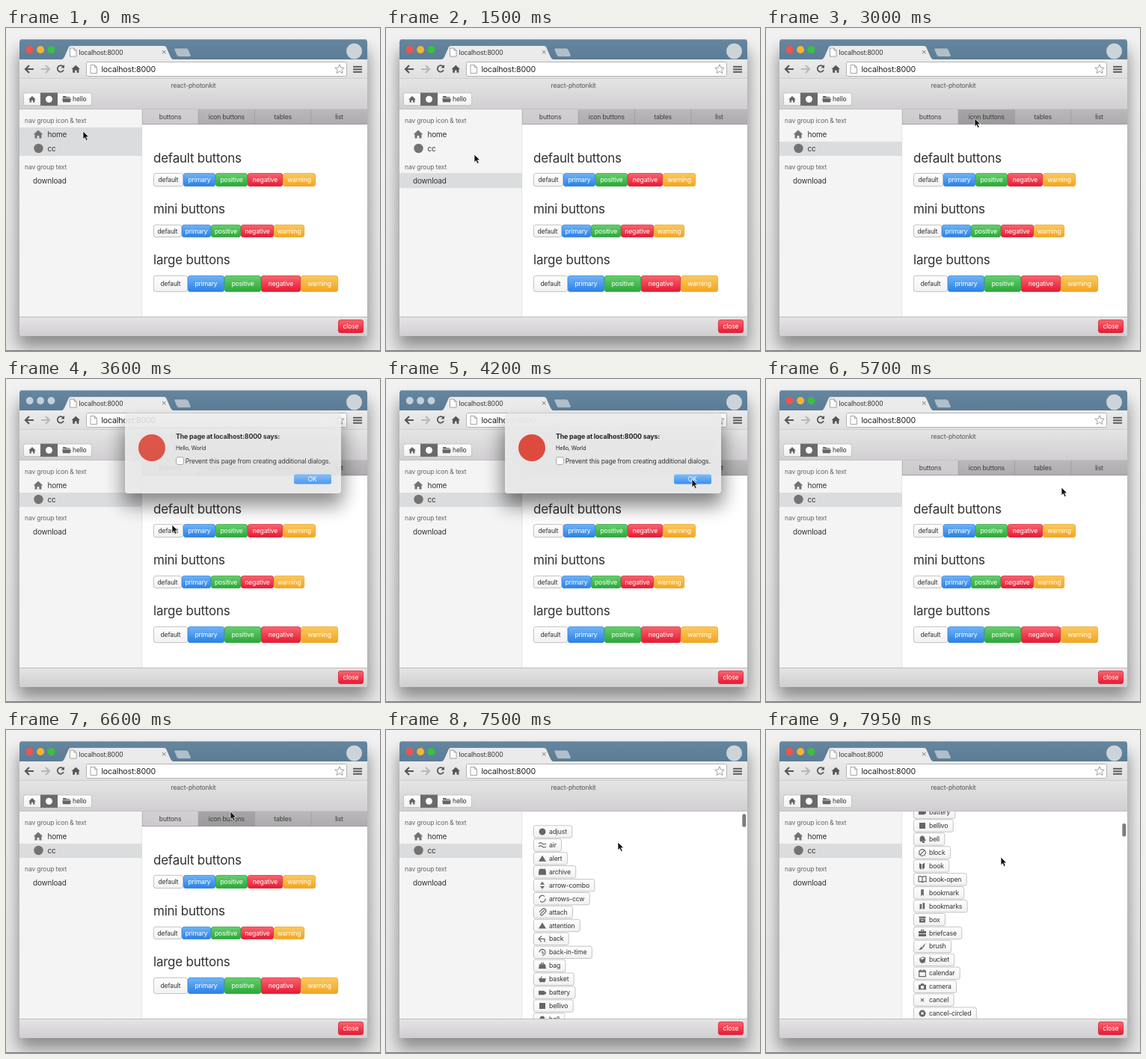
These frames come from a looping animation (500x432 px, 8000 ms). An HTML page:

```html
<!DOCTYPE html>
<html lang="en">
<head>
<meta charset="utf-8">
<title>Desktop component kit demo</title>
<style>
html, body { margin: 0; width: 100%; height: 100%; overflow: hidden; background: #ededed; }
svg { display: block; width: 500px; height: 432px; }
text { font-family: Inter, Roboto, "Liberation Sans", sans-serif; letter-spacing: -.02em; white-space: pre; }
</style>
</head>
<body>
<svg id="stage" viewBox="0 0 500 432" xmlns="http://www.w3.org/2000/svg"></svg>
<script>
const LOOP = 8000, STEP = 150;
const stage = document.getElementById('stage');

// Markup helpers
const rect = (x, y, w, h, fill, more = '') =>
  `<rect x="${x}" y="${y}" width="${w}" height="${h}" fill="${fill}" ${more}/>`;
const text = (x, y, str, size, fill = '#333', more = '') =>
  `<text x="${x}" y="${y}" font-size="${size}" fill="${fill}" ${more}>${str}</text>`;
const path = (d, fill = 'none', more = '') => `<path d="${d}" fill="${fill}" ${more}/>`;
const circle = (x, y, r, fill, more = '') => `<circle cx="${x}" cy="${y}" r="${r}" fill="${fill}" ${more}/>`;
const group = (body, more = '') => `<g ${more}>${body}</g>`;
const line = (d, color, w = 1, more = '') => path(d, 'none', `stroke="${color}" stroke-width="${w}" ${more}`);
const gradient = (id, top, bottom) =>
  `<linearGradient id="${id}" x2="0" y2="1"><stop stop-color="${top}"/><stop offset="1" stop-color="${bottom}"/></linearGradient>`;
const MID = 'text-anchor="middle"';

const DEFS = `<defs>
  ${gradient('gBack', '#f1f1f1', '#e6e6e6')}
  ${gradient('gTop', '#66869f', '#5b7c96')}
  ${gradient('gTool', '#ebebeb', '#dfdfdf')}
  ${gradient('gBar', '#e6e5e6', '#d0ced0')}
  ${gradient('gTab', '#bab8ba', '#adabad')}
  ${gradient('gHover', '#a7a5a7', '#9b999b')}
  ${gradient('gActive', '#d2d0d2', '#cbc9cb')}
  ${gradient('gDefault', '#fefefe', '#f1f1f1')}
  ${gradient('gPrimary', '#70b4f7', '#2a80e6')}
  ${gradient('gPositive', '#67cf6e', '#2aa838')}
  ${gradient('gNegative', '#fa6570', '#e71832')}
  ${gradient('gWarning', '#fbc95f', '#f3a51f')}
  ${gradient('gOk', '#7fbcf7', '#3b8ff0')}
  <filter id="soft" x="-20%" y="-20%" width="140%" height="150%"><feGaussianBlur stdDeviation="10.500"/></filter>
  <filter id="halo" x="-20%" y="-50%" width="140%" height="200%"><feGaussianBlur stdDeviation="13"/></filter>
  <clipPath id="frame"><rect x="18" y="15" width="465" height="397" rx="4"/></clipPath>
  <clipPath id="pane"><rect x="182" y="109" width="301" height="277"/></clipPath>
</defs>`;

const homeIcon = (x, y, s, fill) =>
  path('M0-5.5L6 0H4.3V5H1.3V1.5H-1.3V5H-4.3V0H-6Z', fill, `transform="translate(${x} ${y}) scale(${s})"`);
const folderIcon = (x, y) =>
  path(`M${x} ${y}v-2.5h4l1 1.2h4.5v1.3zM${x - .8} ${y + .8}h11.6l-.8 5h-10z`, '#666');
const pageIcon = (x, y) =>
  path(`M${x} ${y}h5.5l3 3v8h-8.5z`, '#fff', 'stroke="#8d8d8d" stroke-width=".8"') +
  line(`M${x + 5.5} ${y}v3h3`, '#8d8d8d', .8);

function browser() {
  const lights = ['#f1544d', '#f6b52f', '#37c23e'];
  return rect(18, 15, 465, 28, 'url(#gTop)') +
    line('M18 15.5H483', '#86a0b4') +
    lights.map((c, i) => circle(31.7 + i * 14.4, 29, 4.9, c, 'class="light"')).join('') +
    path('M73 42.5Q76 42 77.500 39L83 26.500Q84 23.500 87 23.500H211Q214 23.500 215 26.500L220.500 39Q222 42 225 42.500Z', '#ebebeb', 'stroke="#4d6a81" stroke-width=".6"') +
    path('M226 27H241Q243 27 244 29L247 36Q248 38.500 245 38.500H231Q229 38.500 228 36L225 29Q224.500 27 226 27Z', '#b0bfca', 'stroke="#557288" stroke-width=".6"') +
    pageIcon(85.5, 27) + text(97.5, 36, 'localhost:8000', 8.7) +
    line('M209 30L213.500 34.500M213.500 30L209 34.500', '#777', 1) +
    circle(465.5, 31, 10.5, '#cdd4d9') +
    rect(18, 42, 465, 26, 'url(#gTool)') +
    line('M37 55H26.500M31 50L26 55L31 60', '#555', 2.2) +
    line('M47 55H57.500M53 50L58 55L53 60', '#b9b9b9', 2.2) +
    line('M76.500 51.700A4.300 4.300 0 1 0 77 56.200', '#555', 1.8) + path('M78 49V53.500H73.500Z', '#555') +
    homeIcon(93.3, 55, .95, '#555') +
    rect(107.5, 45.5, 348, 19, '#fff', 'rx="2" stroke="#b4b4b4"') +
    pageIcon(113, 49.5) + text(127.5, 58.5, 'localhost:8000', 10.7, '#222') +
    path('M446 48.800L447.800 53L452.200 53.300L448.800 56.200L449.900 60.500L446 58.100L442.100 60.500L443.200 56.200L439.800 53.300L444.200 53Z', '#fff', 'stroke="#8a8a8a" stroke-width=".8"') +
    [51, 54.5, 58].map(y => rect(464, y - .2, 12, 2, '#5c5c5c')).join('');
}

function header() {
  return rect(18, 67, 465, 42, 'url(#gBar)') +
    line('M18 67.500H483', '#cfcfcf') + line('M18 108.700H483', '#bdbbbd', .8) +
    text(250.5, 79.5, 'react-photonkit', 8.6, '#555', MID) +
    rect(23.5, 87, 91, 16.5, 'url(#gDefault)', 'rx="2.500" stroke="#bdbbbd" stroke-width=".8"') +
    rect(46, 86.6, 23, 17.3, '#6b6a6b') +
    homeIcon(35, 95.5, .8, '#666') + circle(57.5, 95.3, 4.5, '#fff') +
    folderIcon(76, 93.5) + text(89, 98.3, 'hello', 8.6);
}

function sidebar() {
  return rect(18, 109, 164, 277, '#f4f4f4') +
    rect(18, 133, 164, 19, '#dbdcde', 'id="mark"') +
    rect(18, 133, 164, 19, '#dbdcde', 'id="press"') +
    line('M181.700 109V386', '#dcdcdc', .7) +
    text(25, 127, 'nav group icon &amp; text', 8.6, '#666') +
    homeIcon(43, 142.3, 1.05, '#737373') + text(55.5, 146, 'home', 10) +
    circle(43.5, 161, 6.2, '#737373') + text(55.5, 165, 'cc', 10) +
    text(25, 189, 'nav group text', 8.6, '#666') +
    text(36, 207.5, 'download', 10);
}

const TABS = ['buttons', 'icon buttons', 'tables', 'list'];
const tabX = i => 182 + i * 75.25;
const tabBar = () => TABS.map((name, i) =>
  rect(tabX(i), 109, 75.25, 20, 'url(#gTab)', 'class="tab"') +
  line(`M${tabX(i)} 109V129`, '#989698', .8) +
  text(tabX(i) + 37.6, 122, name, 8.6, '#3c3c3c', MID)).join('') +
  line('M182 128.700H483', '#989698', .8);

const KINDS = [
  ['default', '#b5b3b5'], ['primary', '#2d7fda'], ['positive', '#2aa037'],
  ['negative', '#d91d33'], ['warning', '#e9a125']
];
function button(x, y, w, h, [name, edge]) {
  const fill = `url(#g${name[0].toUpperCase() + name.slice(1)})`;
  const ink = name === 'default' ? '#333' : '#fff';
  return rect(x + .4, y + .4, w - .8, h - .8, fill, `rx="2.800" stroke="${edge}" stroke-width=".8"`) +
    text(x + w / 2, y + h / 2 + 3, name, 8.6, ink, MID);
}
const buttonRow = (title, base, y, h, edges) =>
  text(197, base, title, 17, '#333', 'style="letter-spacing:-.014em"') +
  KINDS.map((k, i) => button(edges[i], y, edges[i + 1] - edges[i], h, k)).join('');
const buttonPage = () =>
  buttonRow('default buttons', 179.5, 194, 18, [197, 237, 280, 323, 370, 414]) +
  buttonRow('mini buttons', 248, 263, 17, [197, 235, 274, 314, 358, 399]) +
  buttonRow('large buttons', 315.5, 331, 22, [197, 243, 292, 341, 394, 444]);

// Glyphs drawn around 0,0; those listed in OUTLINED are stroked
const GLYPHS = {
  adjust: 'M0-4.500A4.500 4.500 0 0 1 0 4.500ZM0-4.500A4.500 4.500 0 0 0 0 4.500',
  air: 'M-5-2Q-2-4 0-2T5-2M-5 2Q-2 0 0 2T5 2',
  alert: 'M0-4L5 4H-5ZM0-1V1.500',
  archive: 'M-4-4H4L5 0V4H-5V0Z',
  'arrow-combo': 'M0-5L3-1H-3ZM0 5L3 1H-3Z',
  'arrows-ccw': 'M-4 0A4 4 0 0 1 3-3M4 0A4 4 0 0 1-3 3',
  attach: 'M3-3L-2 2A1 1 0 0 0 0 4L4 0A2.500 2.500 0 0 0 0-4L-4 0',
  attention: 'M0-4L5 4H-5ZM0-1V1.500',
  back: 'M-1-4L-5 0L-1 4M-5 0H3V4',
  'back-in-time': 'M-4 0A4 4 0 1 1 0 4M0-2V1H2',
  bag: 'M-4-2H4L5 4H-5ZM-2-2V-4H2V-2H1V-3H-1V-2Z',
  basket: 'M-5-1H5L3.500 4H-3.500ZM-3-1L-1-4H0L-1.500-1Z',
  battery: 'M-5-2.500H3V-1H5V2H3V3H-5Z',
  bellivo: 'M-4-4H4V4H-4Z',
  bell: 'M-3.500-1Q-3-4.500 0-4.500T3.500 0L5 2L-3 3.500ZM0 3H3V5H0Z',
  block: 'M4.300 0A4.300 4.300 0 1 1-4.300 0A4.300 4.300 0 1 1 4.300 0M-3 3L3-3',
  book: 'M-4-4L-1-2.500V4.500L-4 3ZM0-2.500L3-4.500V2.500L0 4.500Z',
  'book-open': 'M0-3Q-2-4.500-5-4V3Q-2 2.500 0 4Q2 2.500 5 3V-4Q2-4.500 0-3V4',
  bookmark: 'M-1.800-4.500H1.800V4.500L0 2.500L-1.800 4.500Z',
  bookmarks: 'M-3.500-3H-.800V4.500L-2.100 3L-3.500 4.500ZM.500-4.500H3.200V4.500L1.800 3L.500 4.500Z',
  box: 'M-4.500-4H4.500V-1.800H-4.500ZM-4-1H4V4H-4ZM-1.500 .500V1.300H1.500V.500Z',
  briefcase: 'M-5-2.500H-2V-4.500H2V-2.500H5V.500H-5ZM-1-2.500H1V-3.500H-1ZM-5 1.200H5V4.500H-5Z',
  brush: 'M5-5L1.500 1.500L0 0ZM-.500 .500L1 2Q-1 5-5 4.500Q-3 3.500-2.500 1.500Z',
  bucket: 'M-4-2L1-4.500L4.500-3L3.500 3.500L-1 4.500L-3.500 2ZM-3-1.500L0-.500L3-2.500L1-3.500Z',
  calendar: 'M-4.300-3.500H4.300V4.300H-4.300ZM-4.300-2H4.300M-2.200-5V-3M2.200-5V-3',
  camera: 'M-5-2.500H-2.500L-1.500-4.200H1.500L2.500-2.500H5V4H-5ZM0-1.500A2.200 2.200 0 1 0 0 2.900A2.200 2.200 0 1 0 0-1.500Z',
  cancel: 'M-2-2L2 2M2-2L-2 2',
  'cancel-circled': 'M4.500 0A4.500 4.500 0 1 1-4.500 0A4.500 4.500 0 1 1 4.500 0ZM-2-1L-1 0L-2 1L-1 2L0 1L1 2L2 1L1 0L2-1L1-2L0-1L-1-2Z'
};
const OUTLINED = ['air', 'arrows-ccw', 'attach', 'back', 'back-in-time', 'block', 'book-open', 'calendar', 'cancel'];
const PITCH = 17.93;

const iconPage = () => Object.entries(GLYPHS).map(([name, d], i) => {
  const y = 158 + i * PITCH, at = `transform="translate(209 ${y})"`;
  return rect(197.4, y - 8.2, 40, 16.4, 'url(#gDefault)', 'class="chip" rx="2.500" stroke="#b9b7b9" stroke-width=".8"') +
    (OUTLINED.includes(name) ? line(d, '#666', 1.2, at) : path(d, '#666', `fill-rule="evenodd" ${at}`)) +
    text(218, y + 3, name, 8.7);
}).join('');

const dialog = () =>
  rect(157, 62, 293, 107, '#000', 'rx="6" opacity=".5" filter="url(#halo)"') +
  rect(159, 45.5, 289, 107.5, '#ececec', 'rx="4" opacity=".96"') +
  circle(195, 92, 18, '#dd4b3e') +
  text(227, 80, 'The page at localhost:8000 says:', 8.85, '#222', 'font-weight="700"') +
  text(227, 94.5, 'Hello, World', 7.3, '#222') +
  rect(227.5, 104.5, 10, 10, '#fff', 'rx="2.500" stroke="#aaa"') +
  text(239.8, 113, 'Prevent this page from creating additional dialogs.', 8.55) +
  rect(385, 127.5, 50, 13, 'url(#gOk)', 'rx="2.500"') +
  text(409.5, 137, 'OK', 8.3, '#fff', MID);

stage.innerHTML = DEFS +
  rect(0, 0, 500, 432, 'url(#gBack)') +
  rect(16, 30, 469, 396, '#000', 'rx="6" opacity=".4" filter="url(#soft)"') +
  rect(0, 431, 500, 1, '#777') +
  group(
    rect(18, 15, 465, 397, '#fff') + browser() + header() + sidebar() +
    group(group(tabBar() + group(buttonPage(), 'id="buttons"') + group(iconPage(), 'id="icons"'), 'id="scroll"') +
      rect(476.3, 0, 5, 17.5, '#7d7d7d', 'id="thumb" rx="2.500"'), 'clip-path="url(#pane)"') +
    rect(18, 386, 465, 26, 'url(#gBar)') + line('M18 386.500H483', '#bdbbbd') +
    rect(444.4, 390.4, 33.2, 17.2, 'url(#gNegative)', 'rx="2.800" stroke="#d91d33" stroke-width=".8"') +
    text(461, 402, 'close', 8.6, '#fff', MID),
    'clip-path="url(#frame)"') +
  group(dialog(), 'id="dialog"') +
  path('M0 0V10.700L2.400 8.500L4.200 12.400L6.200 11.500L4.400 7.700H7.700Z', '#111', 'id="cursor" stroke="#fff" stroke-width=".7"');

const el = Object.fromEntries(
  ['mark', 'press', 'buttons', 'icons', 'scroll', 'thumb', 'dialog', 'cursor']
    .map(id => [id, document.getElementById(id)]));
const tabs = [...stage.querySelectorAll('.tab')];
const lights = [...stage.querySelectorAll('.light')].map(n => [n, n.getAttribute('fill')]);

function fitChips() {
  for (const chip of stage.querySelectorAll('.chip')) {
    const label = chip.nextElementSibling.nextElementSibling;
    chip.setAttribute('width', 27.5 + label.getComputedTextLength());
  }
}
fitChips();

// Keys: [time, values...]
const CURSOR = [
  [0, 103, 138], [300, 100, 142], [600, 94, 163], [900, 84, 203], [1050, 84, 204],
  [1500, 118, 169], [1800, 104, 162], [2100, 106, 161], [3000, 279, 121], [3150, 270, 130],
  [3450, 222, 195], [3600, 222, 195], [4200, 409, 134], [4500, 412, 134], [4800, 422, 135],
  [5400, 430, 150], [6000, 360, 140], [6600, 300, 109], [6900, 296, 118], [7200, 298, 122],
  [7500, 310, 150], [7950, 314, 170]
];
const SCROLL = [[7350, 0], [7500, 22], [7650, 95], [7800, 185], [7950, 263]];
const FADE = [[3300, 0], [3450, .45], [3600, .92], [3750, 1], [4350, 1], [4500, .4], [4650, 0]];

function sample(keys, t) {
  const i = keys.findIndex(k => k[0] > t);
  if (i < 0) return keys[keys.length - 1].slice(1);
  if (i === 0) return keys[0].slice(1);
  const a = keys[i - 1], b = keys[i], p = (t - a[0]) / (b[0] - a[0]);
  return a.slice(1).map((v, n) => v + (b[n + 1] - v) * p);
}

// Top and height of the selected sidebar row
const ROWS = { home: [133, 19], cc: [152, 19], download: [194, 20] };
function selected(t) {
  if (t < 150 || t >= 1800) return ROWS.cc;
  return t < 900 ? ROWS.home : ROWS.download;
}

function draw(time) {
  const t = Math.floor(time / STEP) * STEP;
  const [x, y] = sample(CURSOR, t);
  const [scroll] = sample(SCROLL, t);
  const [fade] = sample(FADE, t);
  const icons = t >= 6900, active = icons ? 1 : 0;

  el.cursor.setAttribute('transform', `translate(${x} ${y})`);
  const [top, height] = selected(t);
  el.mark.setAttribute('y', top);
  el.mark.setAttribute('height', height);
  el.press.style.display = t < 150 ? '' : 'none';

  tabs.forEach((tab, i) => {
    const hover = !scroll && !fade && y >= 109 && y < 129 && x >= tabX(i) && x < tabX(i + 1);
    tab.setAttribute('fill', `url(#${i === active ? 'gActive' : hover ? 'gHover' : 'gTab'})`);
  });
  el.buttons.style.display = icons ? 'none' : '';
  el.icons.style.display = icons ? '' : 'none';
  el.scroll.setAttribute('transform', `translate(0 ${-scroll})`);
  el.thumb.setAttribute('y', 111 + scroll * 14 / 263);
  el.thumb.style.display = scroll ? '' : 'none';

  el.dialog.setAttribute('opacity', fade);
  lights.forEach(([node, color]) => node.setAttribute('fill', fade ? '#c3d0da' : color));
}

const start = performance.now();
function tick() {
  draw((performance.now() - start) % LOOP);
  requestAnimationFrame(tick);
}
tick();
</script>
</body>
</html>
```
